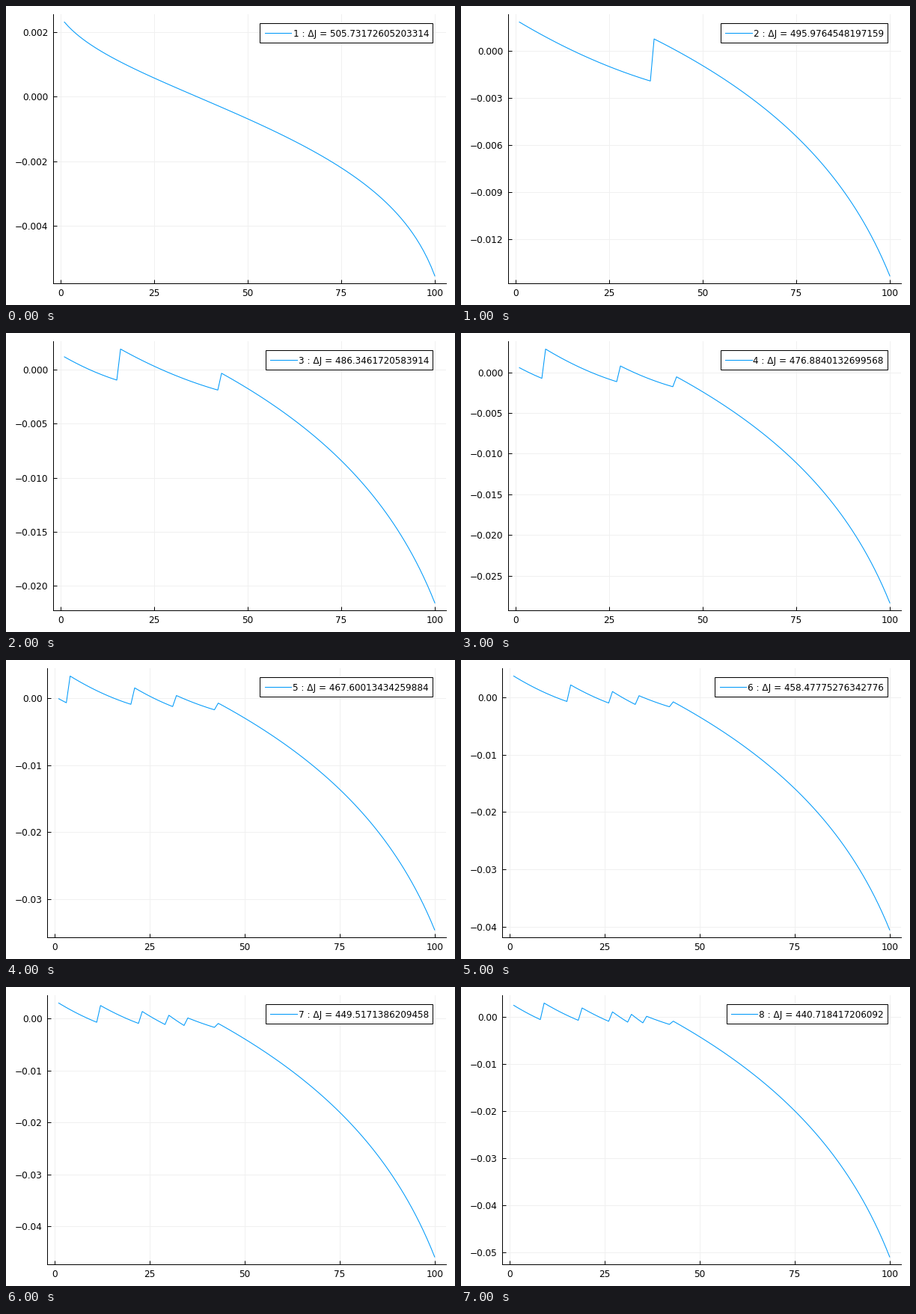
Animation, 600 px wide and 400 px high, one loop 8 s. Source, as a matplotlib script:

```python
import numpy as np
import matplotlib.pyplot as plt
from matplotlib.animation import FuncAnimation
from matplotlib.patches import Rectangle

W, H, DPI = 600, 400, 100
PX = 72 / DPI                      # points per pixel
BLUE = "#009afa"
RIGHT, TOP, BOTTOM = 587.9, 11.3, 371.3
TEXT_RIGHT, TEXT_SIZE = 565, 12    # legend text, pixels

GAINS = ["505.73172605203314", "495.9764548197159", "486.3461720583914",
         "476.8840132699568", "467.60013434259884", "458.47775276342776",
         "449.5171386209458", "440.718417206092"]
TICKS = [2, 3, 5, 5, 10, 10, 10, 10]   # y tick spacing, thousandths
T = np.arange(1, 101)
KNEE = 43                          # the smooth tail starts here

plt.rcParams["font.family"] = "DejaVu Sans"


# Curves, in thousandths

def first_curve(t):
    return (-5.089 + 1.85 * np.log(106.2 - t) - .675 * np.log(t + 5)
            - .007 * t)


def drift(k):
    return .3 - .65 / k


def ceiling(k, t):
    """Height a tooth starts from."""
    return 3.6 - .104 * t + drift(k)


def floor(k, t):
    """Height a tooth falls to."""
    return -.8 - .0006 * t ** 2 + drift(k)


def start_height(k):
    """Value at t = 1: sinks each step and wraps to the top."""
    return (2.95 - .63 * k) % 4.35 - .5


def tooth(t, high, low):
    """Slightly sagging fall from high to low."""
    s = (t - t[0]) / max(t[-1] - t[0], 1)
    sag = min(.08, .005 * (t[-1] - t[0]))
    return high + (low - high) * (s + 4 * sag * s * (1 - s))


def tail(k, t):
    begin = -1.1 * (1 - .7 ** (k - 1))
    end = -6.5 - 111.7 * (1 - .93 ** k)
    v = (t - KNEE) / (100 - KNEE)
    return begin + (end - begin) * np.log(1 - .78 * v) / np.log(.22)


def next_curve(k, previous):
    """Where the previous curve sank through zero, the new one jumps up."""
    sank = (previous[:-1] > 0) & (previous[1:] <= 0)
    jumps = set(T[1:][sank])
    if k > 1:
        jumps.add(KNEE)
    edges = [1] + sorted(jumps)
    y = np.empty(len(T))
    for a, b in zip(edges, edges[1:]):
        high = start_height(k) if a == 1 else ceiling(k, a)
        y[a - 1:b - 1] = tooth(T[a - 1:b - 1], high, floor(k, b - 1))
    y[edges[-1] - 1:] = tail(k, T[edges[-1] - 1:])
    return y


curves = [first_curve(T)]
for step in range(1, len(GAINS)):
    curves.append(next_curve(step, curves[-1]))

fig = plt.figure(figsize=(W / DPI, H / DPI), dpi=DPI, facecolor="white")

ax = fig.add_axes([0.1, 0.1, 0.8, 0.8])
ax.set_axisbelow(True)
ax.grid(color="#f0f0f0", lw=PX)
ax.spines[["top", "right"]].set_visible(False)
ax.spines[["left", "bottom"]].set_linewidth(PX)
ax.tick_params(direction="in", length=5 * PX, width=PX, labelsize=12.1 * PX)
ax.tick_params(axis="x", pad=5)
ax.tick_params(axis="y", pad=5)
ax.set_xlim(1 - .03 * 99, 100 + .03 * 99)
ax.set_xticks(range(0, 101, 25))
curve, = ax.plot([], [], color=BLUE, lw=1.05 * PX)

# Overlay in pixel coordinates for the legend
top = fig.add_axes([0, 0, 1, 1])
top.set(xlim=(0, W), ylim=(H, 0))
top.axis("off")
box = top.add_patch(Rectangle((0, 0), 1, 1, fc="white", ec="black", lw=PX))
key, = top.plot([], [], color=BLUE, lw=1.05 * PX)
label = top.text(TEXT_RIGHT, 41.2, "", ha="right", va="baseline",
                 fontsize=TEXT_SIZE * PX)


def tick_text(value, places):
    return f"{value / 1000:.{places}f}".replace("-", "\u2212")


def draw_axes(y, tick):
    places = 2 if tick == 10 else 3
    left = 55.4 if places == 2 else 63.2
    ax.set_position([left / W, 1 - BOTTOM / H,
                     (RIGHT - left) / W, (BOTTOM - TOP) / H])
    margin = .03 * (y.max() - y.min())
    lo, hi = y.min() - margin, y.max() + margin
    ticks = np.arange(np.ceil(lo / tick), np.floor(hi / tick) + 1) * tick + 0.0
    ax.set_yticks(ticks, [tick_text(v, places) for v in ticks])
    ax.set_ylim(lo, hi)


def draw_legend(i):
    label.set_text(f"{i + 1} : \u0394J = {GAINS[i]}")
    digits = len(GAINS[i]) - 1
    start = TEXT_RIGHT - TEXT_SIZE * (4.38 + .636 * digits)
    edge = round(start - 43.4)
    box.set_bounds(edge, 23, 570 - edge, 26)
    key.set_data([start - 37, start - 1.5], [36.3, 36.3])


def update(i):
    draw_axes(curves[i], TICKS[i])
    draw_legend(i)
    curve.set_data(T, curves[i])
    return curve, box, key, label


anim = FuncAnimation(fig, update, frames=len(GAINS), interval=1000,
                     init_func=lambda: update(0), repeat=True,
                     repeat_delay=0, blit=False)
plt.show()
```
